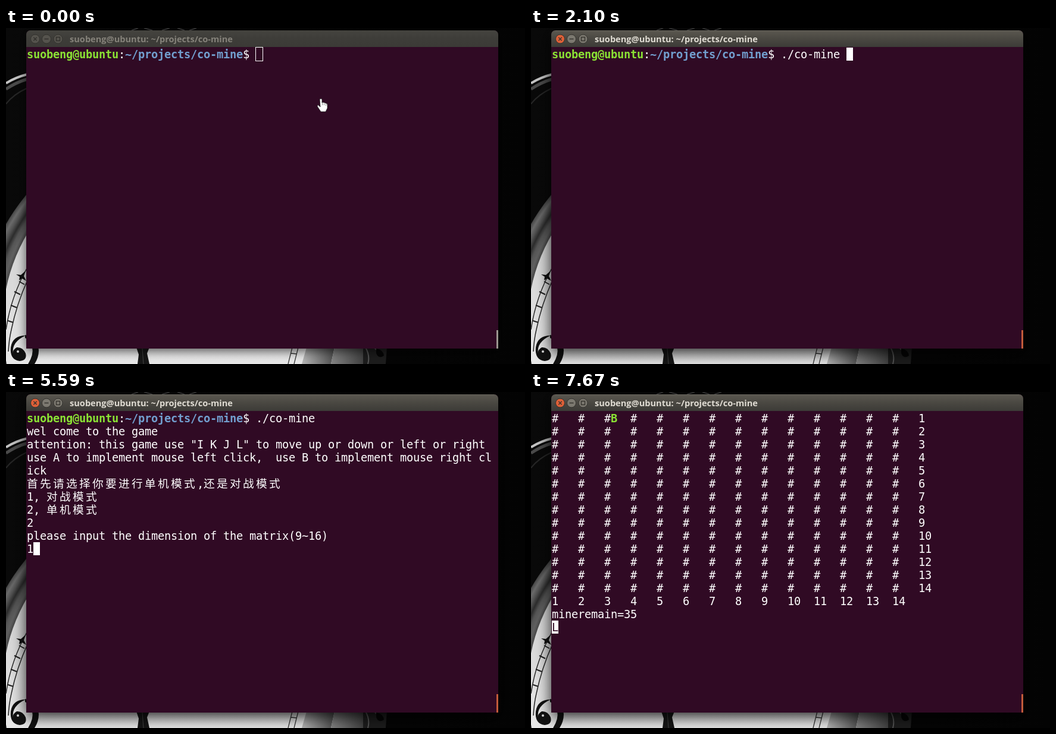
Recreate the animation shown at these times as an HTML page with a canvas. Size 872x566 px, loop 7990 ms.

```html
<!DOCTYPE html>
<html lang="en">
<head>
<meta charset="utf-8">
<title>Terminal game</title>
<style>
  html, body { margin: 0; height: 100%; overflow: hidden; background: #060606; }
  canvas { display: block; }
</style>
</head>
<body>
<canvas width="872" height="566"></canvas>
<script>
const canvas = document.querySelector('canvas');
const ctx = canvas.getContext('2d');
const LOOP = 7990, CELL = 11, ROW = 22, LEFT = 35, TOP = 33;
const MONO = '18.67px "DejaVu Sans Mono", monospace';
const CJK = '18.67px "Noto Sans CJK SC", "Noto Sans CJK", sans-serif';
const GREEN = '#8ae234', BLUE = '#729fcf', WHITE = '#fff', PURPLE = '#300a24';
const USER = 'suobeng@ubuntu', DIR = '~/projects/co-mine', COMMAND = './co-mine ';
const KEY_TIMES = [[1230, 1], [1400, 2], [1630, 3], [1780, 4], [2100, 10]];

const INTRO = [
  'wel come to the game',
  'attention: this game use "I K J L" to move up or down or left or right',
  'use A to implement mouse left click,  use B to implement mouse right cl',
  'ick',
  '首先请选择你要进行单机模式,还是对战模式',
  '1, 对战模式',
  '2, 单机模式'
];

function shape(d, fill, stroke, width = 1) {
  const path = new Path2D(d);
  if (fill) { ctx.fillStyle = fill; ctx.fill(path); }
  if (stroke) { ctx.strokeStyle = stroke; ctx.lineWidth = width; ctx.stroke(path); }
}

function disc(x, y, r, fill, stroke, width = 1) {
  ctx.beginPath();
  ctx.arc(x, y, r, 0, Math.PI * 2);
  if (fill) { ctx.fillStyle = fill; ctx.fill(); }
  if (stroke) { ctx.strokeStyle = stroke; ctx.lineWidth = width; ctx.stroke(); }
}

function addStops(g, colors) {
  colors.forEach((c, i) => g.addColorStop(i / (colors.length - 1), c));
  return g;
}

function gradient(x0, y0, x1, y1, ...colors) {
  return addStops(ctx.createLinearGradient(x0, y0, x1, y1), colors);
}

function wallpaper() {
  ctx.fillStyle = gradient(0, 0, 872, 0, '#090909', '#050505', '#030303');
  ctx.fillRect(0, 0, 872, 566);
  // strap and ring above the clock
  shape('M0 93Q16 83 36 78', null, '#c4c4c4', 4);
  shape('M0 103Q16 92 36 86', null, '#4a4a4a', 5);
  shape('M0 128Q12 112 36 101', null, '#262626', 2);
  shape('M211 4L222 0M232 0L246 4M262 4L275 0M288 0L300 4M308 4L320 0', null, '#444', 1.5);

  // clock rim and face
  const rim = ctx.createRadialGradient(298, 500, 303, 298, 500, 343);
  disc(298, 500, 343, addStops(rim, ['#444', '#606060', '#555', '#2c2c2c', '#505050', '#6a6a6a', '#444']));
  disc(298, 500, 304, gradient(0, 380, 0, 566, '#d6d6d6', '#ddd', '#e8e8e8'));
  shape('M505 538L552 538 546 566 497 566Z', gradient(500, 0, 550, 0, '#b0b0b0', '#505050'));
  shape('M552 538L604 538 604 566 546 566Z', gradient(548, 0, 604, 0, '#808080', '#3c3c3c'));
  shape('M600 538L640 538 638 566 600 566Z', '#1c1c1c');
  shape('M604 538Q612 552 608 566M618 538L632 550', null, '#555', 2);
  shape('M622 540Q634 542 635 552Q626 558 622 548Z', '#050505');

  // minute track
  shape('M36 403Q8 453 0 508M36 425Q18 465 9 508Q5 525 4 545', null, '#222', 1.5);
  shape('M22 427L31 432M14 444L24 449M8 467L18 471M3 493L12 496', null, '#222', 2);
  shape('M17 415L25 416 33 409 30 418 34 426 27 422 22 425 23 419Z', '#111');
  shape('M481 538L474 566M491 538L484 566M479 548L488 549', null, '#333', 1.3);

  // numeral and clock hand
  shape('M33 518Q11 518 8 538Q6 559 23 561Q36 560 33 548Q28 537 18 538Q11 542 12 548Q9 529 33 518Z', '#111');
  disc(20, 545, 2, '#ddd');
  shape('M32 517Q54 522 55 543Q55 555 48 566L37 566Q47 550 44 538Q41 526 32 522Z', '#111');
  shape('M219 538L241 538 237 548 241 566 221 566 223 550Z', '#151515');
  shape('M229 540L231 566', null, '#444', 1);
}

function titleBar(focused) {
  ctx.beginPath();
  ctx.roundRect(34, 4, 793, 29, [7, 7, 0, 0]);
  ctx.fillStyle = focused ? gradient(0, 4, 0, 32, '#5b5850', '#4a4842', '#3c3b37')
                          : gradient(0, 4, 0, 32, '#45443f', '#3e3d39', '#3b3a36');
  ctx.fill();
  if (focused) shape('M41 4.5H820', null, '#69665e');
  [49, 68, 87.5].forEach((x, i) => {
    const fill = !focused ? '#55534d' : i ? '#7c7970' : '#df6038';
    disc(x, 18.5, 7.5, fill, '#33322e');
  });
  const mark = focused ? '#35332e' : '#302f2b';
  shape('M46.3 15.8L51.7 21.2M51.7 15.8L46.3 21.2M64.5 18.5H71.5M84.5 15.5H90.5V21.5H84.5Z',
    null, mark, 1.4);
  ctx.font = 'bold 14.6px "Open Sans", sans-serif';
  ctx.fillStyle = focused ? '#dfdbd2' : '#85827a';
  ctx.fillText(`${USER}: ${DIR}`, 107, 24);
}

function terminalWindow(focused) {
  ctx.save();
  ctx.shadowColor = focused ? 'rgba(0,0,0,.85)' : 'rgba(0,0,0,.65)';
  ctx.shadowBlur = focused ? 26 : 18;
  ctx.shadowOffsetY = focused ? 7 : 4;
  ctx.fillStyle = PURPLE;
  ctx.beginPath();
  ctx.roundRect(34, 4, 793, 536, [7, 7, 0, 0]);
  ctx.fill();
  ctx.restore();
  titleBar(focused);
  ctx.fillStyle = PURPLE;
  ctx.fillRect(34, 32, 793, 508);
  ctx.fillStyle = focused ? '#c25b3a' : '#9b9690';
  ctx.fillRect(824, 509, 3, 31);
}

// One glyph per grid cell; wide characters take two cells.
function put(text, col, row, color = WHITE, bold = false) {
  ctx.fillStyle = color;
  for (const glyph of text) {
    const wide = glyph >= '一';
    ctx.font = wide ? CJK : (bold ? 'bold ' : '') + MONO;
    ctx.fillText(glyph, LEFT + col * CELL, TOP + row * ROW + 18);
    col += wide ? 2 : 1;
  }
}

function block(col, row) {
  ctx.fillStyle = WHITE;
  ctx.fillRect(LEFT + col * CELL, TOP + row * ROW, CELL, ROW);
}

function shell(t) {
  put(USER, 0, 0, GREEN, true);
  put(':', 14, 0);
  put(DIR, 15, 0, BLUE, true);
  put('$', 33, 0);
  const typed = KEY_TIMES.reduce((n, [at, count]) => t >= at ? count : n, 0);
  put(COMMAND.slice(0, typed), 35, 0);
  if (t < 680) {
    ctx.strokeStyle = WHITE;
    ctx.lineWidth = 1;
    ctx.strokeRect(419.5, 32.5, 12, 23);
  } else if (t < 2560) {
    block(35 + typed, 0);
  }
  if (t < 2560) return;

  INTRO.forEach((line, i) => put(line, 0, i + 1));
  if (t >= 3800) put('2', 0, 8);
  if (t < 4030) return block(t < 3800 ? 0 : 1, 8);
  put('please input the dimension of the matrix(9~16)', 0, 9);
  const digits = t < 5590 ? 0 : t < 5670 ? 1 : 2;
  put('14'.slice(0, digits), 0, 10);
  if (t < 5980) return block(digits, 10);
  put('please wait a monment.....', 0, 11);
  block(0, 12);
}

function board(t) {
  for (let row = 0; row < 14; row++) {
    for (let col = 0; col < 14; col++) put('#', col * 4, row);
    put(`${row + 1}`, 56, row);
    put(`${row + 1}`, row * 4, 14);
  }
  put('mineremain=35', 0, 15);
  block(0, 16);
  if (t >= 7520) {
    put('L', 0, 16, PURPLE);
    put('B', t < 7670 ? 5 : 9, 0, GREEN, true);
  }
}

function pointer(t) {
  if (t < 610) {
    ctx.save();
    ctx.translate(t < 440 ? 523 : 508, t < 440 ? 118 : 142);
    shape('M4 2Q6 0 8 2V8Q10 6 11 8Q13 7 14 9Q16 8 17 11V17L14 23H6L0 14Q0 11 2 12L5 15Z',
      WHITE, '#222', 0.8);
    shape('M8.5 8V12M11.5 9V12M14.5 10V13', null, '#555', 0.7);
    ctx.restore();
  } else if (t < 1230) {
    shape('M522 144.5H527M524.5 144.5V157.5M522 157.5H527', null, WHITE, 1);
  }
}

function frame(now) {
  const t = now % LOOP;
  wallpaper();
  terminalWindow(t >= 610);
  (t < 6980 ? shell : board)(t);
  pointer(t);
  requestAnimationFrame(frame);
}
requestAnimationFrame(frame);
</script>
</body>
</html>
```
